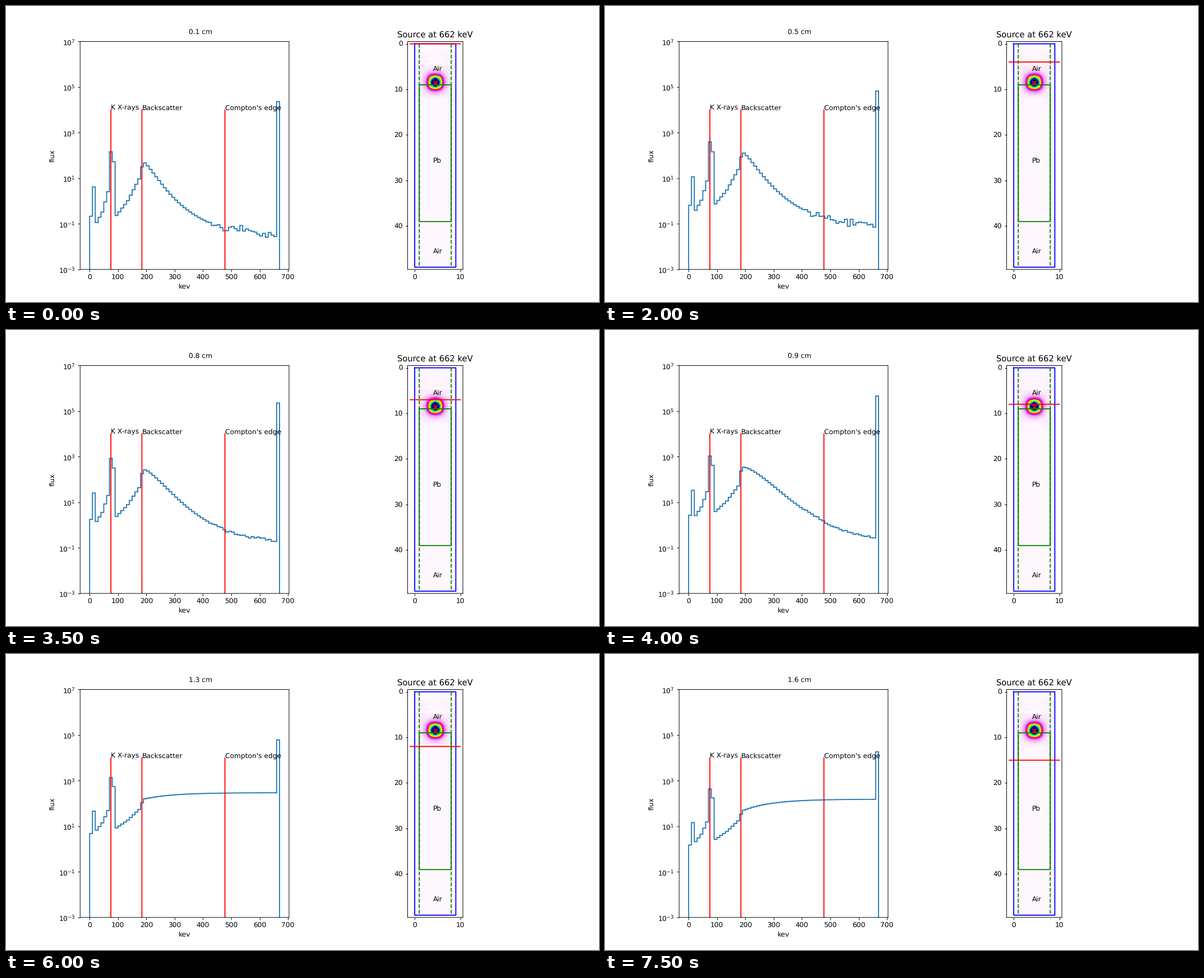
These frames come from a looping animation (1058x529 px, 8 s). A matplotlib script:

```python
import numpy as np
import matplotlib.pyplot as plt
from matplotlib.animation import FuncAnimation

W = 1058
FRAMES, INTERVAL = 16, 500
TOP, DECADE = 63.5, 40.72      # pixel row of 1e7 and pixels per decade
SOURCE_X, SOURCE_Y = 4.5, 8.5

# Low-energy shape in pixels below the K line, at a few bins.
LOW_BINS = [0, 1, 2, 4, 6, 7, 8, 9, 13, 17]
IN_AIR = np.array([116, 63, 128, 109, 72, 0, 18, 115, 88, 48])
IN_LEAD = np.array([100, 60, 94, 81, 59, 0, 16, 90, 76, 57])

plt.rcParams["path.snap"] = False
plt.rcParams["text.hinting"] = "none"


def air_spectrum(dist, rng):
    """Pixel rows of K line, photopeak, low mix and continuum above the lead."""
    near = np.exp(-dist / 1.5)
    k_line = 223 + 4.4 * dist
    u = np.arange(47)
    fall = (u / (14.5 + 14 * near)) ** (1.2 + 0.4 * near)
    tail = k_line + 20 + (130 + 10 * near) * (1 - np.exp(-fall))
    tail[22:] += rng.normal(0, 1.5 * np.sqrt(dist), 25)
    return k_line, 101 + 24 * np.sqrt(dist), 0.75 * np.exp(-dist / 3), tail


def lead_spectrum(dist):
    """The same inside the lead, where the continuum is nearly flat."""
    k_line = 197 + 6.8 * dist
    tilt = 70 * np.exp(-dist / 1.9) - 22
    tail = k_line + 38 + tilt * (1 - np.exp(-np.arange(47) / 10))
    return k_line, 94.5 + 31.5 * np.sqrt(dist), 1, tail


def spectrum(depth):
    dist = abs(depth - SOURCE_Y)
    if depth < SOURCE_Y:
        parts = air_spectrum(dist, np.random.default_rng(depth))
    else:
        parts = lead_spectrum(dist)
    k_line, peak, mix, tail = parts
    shape = IN_AIR + mix * (IN_LEAD - IN_AIR)
    low = k_line + np.interp(np.arange(18), LOW_BINS, shape)
    rows = np.concatenate([low, [tail[0] + 7], tail, [peak]])
    return 10 ** (7 - (rows - TOP) / DECADE)


def flux_map():
    y, x = np.mgrid[0:50, 0:10]
    r2 = (x - SOURCE_X) ** 2 + (y - SOURCE_Y) ** 2
    core = 0.6 * np.exp((0.5 - r2) / 1.8)
    halo = 0.2 / r2 * np.exp(-0.1 * np.clip(y - 9, 0, 30))
    return core + halo


fig, (left, right) = plt.subplots(1, 2, figsize=(12, 6), dpi=W / 12)

left.set_yscale("log")
left.set_xlim(-33.5, 703.5)
left.set_ylim(1e-3, 1e7)
left.set_yticks([10.0 ** p for p in range(-3, 8, 2)])
left.minorticks_off()
left.set_xlabel("kev")
left.set_ylabel("flux")
steps = left.stairs(spectrum(0), np.arange(0, 671, 10), baseline=1e-6,
                    color="C0", lw=1.5)
for energy, name in [(75, "K X-rays"), (184.4, "Backscatter"),
                     (477.3, "Compton's edge")]:
    left.plot([energy, energy], [1e-3, 1e4], "r")
    left.text(energy, 1e4, name)
label = left.text(350, 2e7, "")

right.imshow(flux_map(), cmap="gist_ncar_r", interpolation="sinc",
             vmin=0, vmax=1)
right.set_title("Source at 662 keV")
right.plot([0, 9, 9, 0, 0], [0, 0, 49, 49, 0], "b")
for x in (1, 8):
    right.plot([x, x], [0, 49], "g--")
right.plot([1, 8, 8, 1, 1], [9, 9, 39, 39, 9], "g")
right.scatter(SOURCE_X, SOURCE_Y, marker="x", c="r", zorder=3)
for y, name in [(6, "Air"), (26, "Pb"), (46, "Air")]:
    right.text(4, y, name)
scan, = right.plot([-1, 10], [0, 0], "r")
right.set_xlim(-1.55, 10.55)
right.set_ylim(49.5, -0.5)
right.set_xticks([0, 10])
right.set_yticks(range(0, 50, 10))


def update(i):
    steps.set_data(spectrum(i))
    label.set_text(f"{(i + 1) / 10:.1f} cm")
    scan.set_ydata([i, i])
    return steps, label, scan


anim = FuncAnimation(fig, update, frames=FRAMES, interval=INTERVAL,
                     repeat=True, repeat_delay=0)
plt.show()
```
